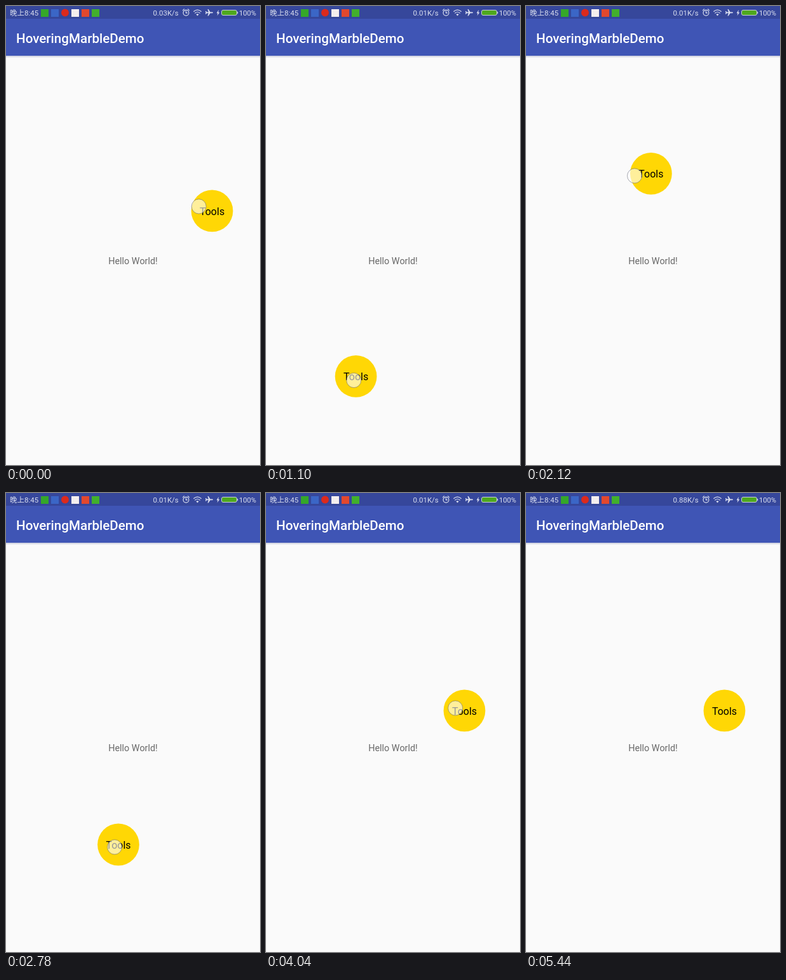
An HTML page for the animation above (5.46 s loop, 400 by 720 pixels).

```html
<!DOCTYPE html>
<html lang="en">
<head>
<meta charset="utf-8">
<title>Floating button</title>
<style>
  html, body { margin: 0; width: 100%; height: 100%; overflow: hidden; background: #fafafa; }
  svg { display: block; width: 400px; height: 720px; font-family: Roboto, "Noto Sans CJK SC", "Noto Sans CJK", sans-serif; }
  .status { font-size: 11.5px; fill: #d9deef; }
  .line { fill: none; stroke: #d9deef; stroke-width: 1.2; stroke-linecap: round; }
  .solid { fill: #d9deef; }
</style>
</head>
<body>
<svg viewBox="0 0 400 720">
  <defs>
    <linearGradient id="shade" x2="0" y2="1">
      <stop stop-color="#c6cada"/>
      <stop offset="1" stop-color="#fafafa"/>
    </linearGradient>
  </defs>
  <rect width="400" height="720" fill="#fafafa"/>
  <rect y="78" width="400" height="3.5" fill="url(#shade)"/>
  <rect width="400" height="78" fill="#3f55b5"/>
  <rect width="400" height="20" fill="#36479b"/>

  <!-- status bar -->
  <text class="status" x="6" y="15">晚上8:45</text>
  <rect x="55" y="5" width="12" height="12" fill="#35a829"/>
  <rect x="71" y="5" width="12" height="12" fill="#3b66c6"/>
  <circle cx="93" cy="10.5" r="6" fill="#dc2a1c"/>
  <rect x="103" y="5" width="12" height="12" fill="#f4eeee"/>
  <rect x="119" y="5" width="12" height="12" fill="#e2482e"/>
  <rect x="135" y="5" width="12" height="12" fill="#42b02c"/>
  <text class="status" id="speed" x="271.8" y="15" text-anchor="end"></text>
  <g class="line">
    <circle cx="283.5" cy="10.7" r="4.4"/>
    <path d="M283.5 8.2v2.7h2M278.5 6.8l2-2M288.5 6.8l-2-2"/>
    <path d="M295.8 8.5q5.7-4.7 11.4 0M297.8 11q3.7-3 7.4 0"/>
  </g>
  <path class="solid" d="M299.4 13q2.1-1.7 4.2 0l-2.1 2.4z"/>
  <path class="solid" d="M326 10.3q0-.9-1.2-.9h-3.1l-2.9-4.4h-1.3l1.4 4.4h-2.7l-1.2-1.5h-1l.6 2.4-.6 2.4h1l1.2-1.5h2.7l-1.4 4.4h1.3l2.9-4.4h3.1q1.2 0 1.2-.9z"/>
  <path class="solid" d="M335 6l-3.5 5.3h2l-.9 4 3.7-5.4h-2z"/>
  <rect x="339.5" y="6.5" width="24" height="8" rx="2.5" fill="#4fa81e" stroke="#c4ccda"/>
  <path class="solid" d="M364.2 9h1v3h-1z"/>
  <text class="status" x="367" y="15" style="font-size:11.2px">100%</text>

  <text x="16" y="57.7" font-size="20.6" font-weight="500" fill="#fff">HoveringMarbleDemo</text>
  <text x="200" y="405" font-size="14.4" text-anchor="middle" fill="#696969">Hello World!</text>

  <g id="button">
    <circle r="32.9" fill="#ffd705"/>
    <text y="6.3" font-size="16" text-anchor="middle" fill="#000">Tools</text>
  </g>
  <circle id="touch" r="11.5" fill="#fff" fill-opacity=".6" stroke="#505468" stroke-opacity=".5"/>
</svg>
<script>
  const LOOP = 5460, STEP = 20;
  const button = document.getElementById('button');
  const touch = document.getElementById('touch');
  const speed = document.getElementById('speed');

  // The button circles counterclockwise on a loose ellipse:
  // time, angle in degrees, size of the ellipse
  const CX = 204, CY = 420, RX = 138, RY = 160;
  const turns = [
    [0, 35.2, 1.069], [600, 149.9, .899], [1100, 245.8, 1.103], [1680, 374, 1.02],
    [2120, 453, .983], [2780, 616.6, .845], [3420, 752, .927]
  ];

  const progress = (t, from, to) => Math.min(1, Math.max(0, (t - from) / (to - from)));
  const mix = (a, b, u) => a + (b - a) * u;

  function buttonAt(t) {
    const next = turns.findIndex(key => key[0] > t);
    const i = next < 0 ? turns.length - 1 : next;
    const a = turns[i - 1], b = turns[i], u = progress(t, a[0], b[0]);
    const angle = mix(a[1], b[1], u) * Math.PI / 180, size = mix(a[2], b[2], u);
    return [CX + RX * size * Math.cos(angle), CY - RY * size * Math.sin(angle)];
  }

  // The finger runs one step ahead of the button, then swipes up from the bottom
  function fingerAt(t) {
    if (t <= 4060) {
      const [x, y] = buttonAt(t + STEP);
      return [x - 14.3, y + mix(1.5, -4, progress(t, 3700, 4040))];
    }
    return t >= 4360 && t < 5080 ? [240, mix(678, 643, progress(t, 4360, 4480))] : null;
  }

  const place = (el, [x, y]) => el.setAttribute('transform', `translate(${x.toFixed(2)} ${y.toFixed(2)})`);

  function draw() {
    const t = Math.floor(performance.now() % LOOP / STEP) * STEP;
    place(button, buttonAt(t));
    const tip = fingerAt(t);
    touch.style.display = tip ? '' : 'none';
    if (tip) place(touch, tip);
    speed.textContent = (t < 300 ? '0.03' : t < 4800 ? '0.01' : '0.88') + 'K/s';
    requestAnimationFrame(draw);
  }
  draw();
</script>
</body>
</html>
```
